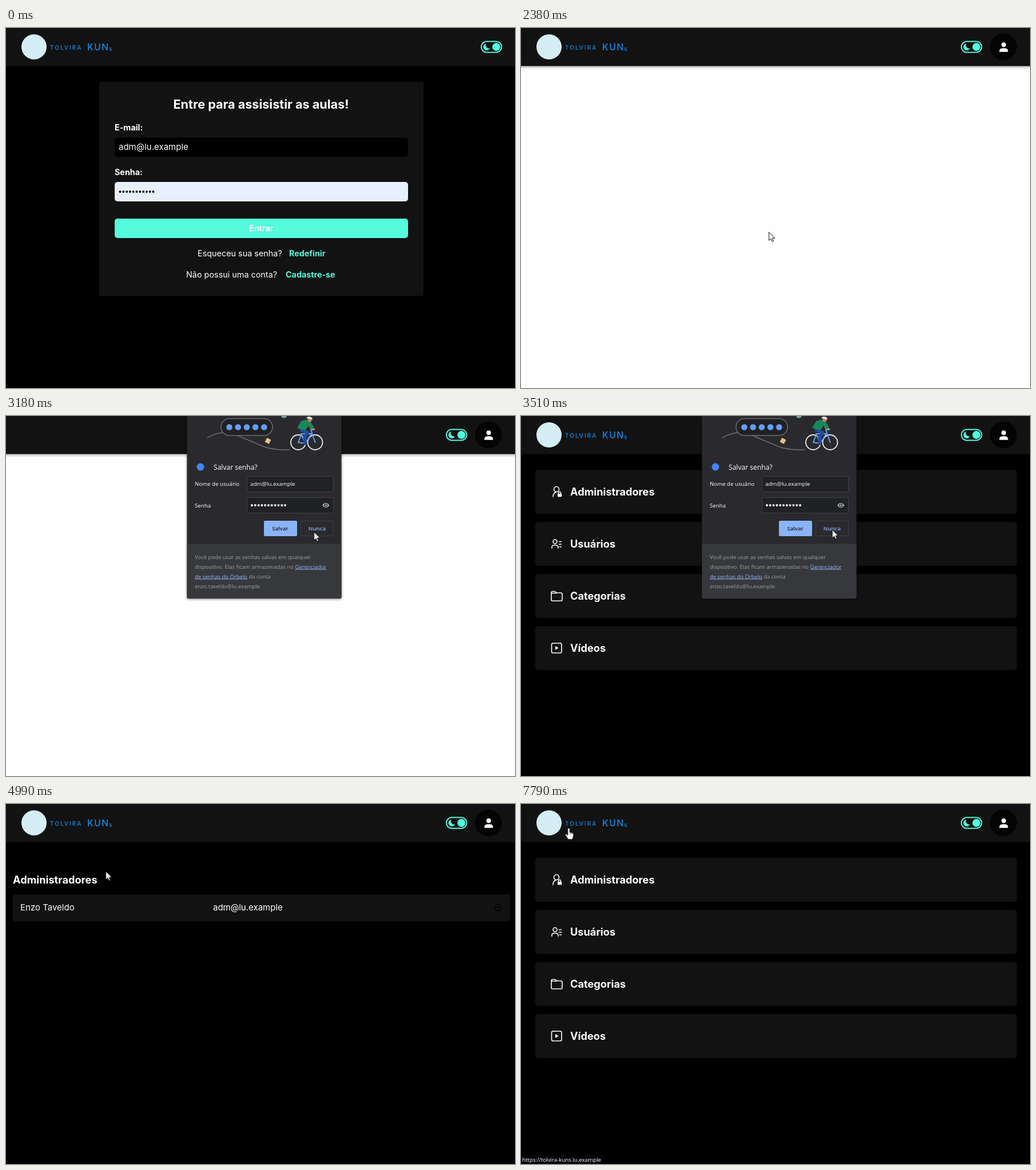
Animation of 890 by 629 pixels, one loop 7.99 s. Source, as an HTML page:

```html
<!DOCTYPE html>
<html lang="pt-BR">
<head>
<meta charset="utf-8">
<title>Painel de aulas</title>
<style>
html, body { margin: 0; width: 100%; height: 100%; overflow: hidden; background: #000; }
svg { display: block; width: 100vw; height: 100vh; }
text { font: 14.4px Inter, sans-serif; fill: #fff; }
.b { font-weight: 700; font-size: 14.3px; }
.h { font-weight: 700; font-size: 18.2px; }
.big { font-size: 21.6px; }
.data { font-size: 15px; }
.mid { text-anchor: middle; }
.mint { fill: #54fbdc; }
.panel { fill: #121212; }
.line { fill: none; stroke: #fff; stroke-width: 1.6; stroke-linecap: round; stroke-linejoin: round; }
#brand text { font-size: 10px; font-weight: 500; letter-spacing: 2px; fill: #0b8df0; }
#brand .wide { font-size: 15.5px; letter-spacing: 1.5px; }
#popup text, .status { font: 9.7px "Open Sans", "Noto Sans", sans-serif; }
#popup .title { font-size: 12.1px; }
#popup .note { font-size: 9.5px; fill: #9aa0a6; }
#popup .link { fill: #8ab4f8; text-decoration: underline; }
#popup .btn { font-weight: 600; }
#popup .save { fill: #202124; }
#popup .never { fill: #8ab4f8; }
.dots { fill: none; stroke-width: 3.9; stroke-linecap: round; stroke-dasharray: 0 5.8; }

/* scenes and swaps are hard cuts on one shared clock */
.cut { animation: 7.99s step-end infinite; }
#login { animation-name: login; }
#idle { animation-name: idle; }
#busy { animation-name: busy; }
#user { animation-name: user; }
#blank { animation-name: blank; }
#brand { animation-name: brand; }
#dash { animation-name: dash; }
#admins { animation-name: admins; }
#status { animation-name: status; }
#arrow { animation-name: arrow; }
#hand { animation-name: hand; }
#beam { animation-name: beam; }
#popup { animation: popup 7.99s linear infinite; }
#cursor { animation: move 7.99s linear infinite; }

@keyframes login { 0% { opacity: 1 } 28.91%, 100% { opacity: 0 } }
@keyframes idle { 0% { opacity: 1 } 21.65%, 100% { opacity: 0 } }
@keyframes busy { 0% { opacity: 0 } 21.65%, 100% { opacity: 1 } }
@keyframes user { 0% { opacity: 0 } 28.91%, 100% { opacity: 1 } }
@keyframes blank { 0% { opacity: 0 } 28.91% { opacity: 1 } 43.05%, 100% { opacity: 0 } }
@keyframes brand { 0% { opacity: 1 } 37.3% { opacity: 0 } 43.05%, 100% { opacity: 1 } }
@keyframes dash { 0% { opacity: 0 } 43.05% { opacity: 1 } 59.07% { opacity: 0 } 95.87%, 100% { opacity: 1 } }
@keyframes admins { 0% { opacity: 0 } 59.07% { opacity: 1 } 95.87%, 100% { opacity: 0 } }
@keyframes status { 0% { opacity: 0 } 96.7%, 100% { opacity: 1 } }
@keyframes popup { 0%, 31.4% { opacity: 0 } 34%, 48% { opacity: 1 } 50%, 100% { opacity: 0 } }
@keyframes arrow {
  0% { opacity: 0 } 4.88% { opacity: 1 } 16.5% { opacity: 0 } 28.91% { opacity: 1 }
  48.6% { opacity: 0 } 59.07% { opacity: 1 } 73.5% { opacity: 0 } 77.6% { opacity: 1 }
  81% { opacity: 0 } 84.9% { opacity: 1 } 91.8%, 100% { opacity: 0 }
}
@keyframes hand {
  0% { opacity: 0 } 16.5% { opacity: 1 } 28.91% { opacity: 0 } 48.6% { opacity: 1 }
  59.07% { opacity: 0 } 81% { opacity: 1 } 84.9% { opacity: 0 } 91.8%, 100% { opacity: 1 }
}
@keyframes beam { 0% { opacity: 0 } 73.5% { opacity: 1 } 77.6%, 100% { opacity: 0 } }
@keyframes move {
  0%, 4.8% { transform: translate(793px, 625px) }
  9.5% { transform: translate(600px, 490px) }
  14.02% { transform: translate(447px, 382px) }
  16.5% { transform: translate(431px, 354px) }
  18.15%, 19.8% { transform: translate(435px, 347px) }
  19.9%, 28.9% { transform: translate(428px, 347px) }
  28.91%, 36.7% { transform: translate(433.5px, 356.5px) }
  39.8%, 40.5% { transform: translate(538.5px, 202.5px) }
  43% { transform: translate(545px, 198px) }
  47.9% { transform: translate(541px, 200px) }
  51.44%, 52.2% { transform: translate(411px, 245px) }
  55.5% { transform: translate(50px, 165px) }
  57.5%, 59.1% { transform: translate(112px, 130px) }
  60.8% { transform: translate(152px, 104px) }
  62.45%, 64.6% { transform: translate(174.5px, 117.5px) }
  68.8% { transform: translate(517px, 194px) }
  74.2%, 77% { transform: translate(109.5px, 132.5px) }
  81% { transform: translate(52px, 46px) }
  83.35%, 84.2% { transform: translate(78px, 35px) }
  87.48% { transform: translate(812px, 50px) }
  88.36%, 89% { transform: translate(827px, 54px) }
  92.49%, 94% { transform: translate(80px, 45px) }
  94.5%, 100% { transform: translate(83.5px, 42px) }
}
</style>
</head>
<body>
<svg viewBox="0 0 890 629" preserveAspectRatio="none">
  <defs>
    <g id="toggle">
      <rect x="1" y="23.5" width="35.5" height="19" rx="9.5" fill="none" stroke="#54fbdc" stroke-width="2"/>
      <circle class="mint" cx="27.3" cy="33" r="7"/>
      <path class="mint" d="M9.5 27.2a6 6 0 1 0 6.6 8.2 5.6 5.6 0 0 1-6.6-8.2z"/>
    </g>
    <linearGradient id="shade" x2="0" y2="1">
      <stop stop-color="#000" stop-opacity=".28"/>
      <stop offset="1" stop-color="#000" stop-opacity="0"/>
    </linearGradient>
    <filter id="drop" x="-10%" y="-10%" width="120%" height="120%">
      <feDropShadow dx="0" dy="1" stdDeviation="2" flood-opacity=".5"/>
    </filter>
  </defs>

  <rect width="890" height="629"/>
  <g id="blank" class="cut">
    <rect y="66" width="890" height="563" fill="#fefefe"/>
    <rect y="66" width="890" height="6" fill="url(#shade)"/>
  </g>
  <rect class="panel" width="890" height="66.5"/>

  <g id="brand" class="cut">
    <circle cx="49" cy="33" r="22" fill="#d5eef5"/>
    <text x="77" y="37.5">TOLVIRA</text>
    <text class="wide" x="142" y="39">KUN<tspan dy="1" font-size="10">s</tspan></text>
  </g>

  <g id="user" class="cut">
    <use href="#toggle" x="769"/>
    <circle cx="843.5" cy="33" r="23.5" fill="#040404"/>
    <circle cx="844" cy="29.3" r="4" fill="#fff"/>
    <path d="M836.5 41.7v-2q0-4.4 7.5-4.4t7.5 4.400v2z" fill="#fff"/>
  </g>

  <g id="login" class="cut">
    <use href="#toggle" x="830"/>
    <rect class="panel" x="163" y="94" width="567" height="374" rx="3"/>
    <text class="h big mid" x="446" y="141">Entre para assisistir as aulas!</text>
    <text class="b" x="190" y="179">E-mail:</text>
    <rect x="190" y="191.5" width="513" height="33.5" rx="5"/>
    <text class="data" x="197" y="213">adm@lu.example</text>
    <text class="b" x="190" y="257">Senha:</text>
    <rect x="190" y="269" width="513" height="34" rx="5" fill="#e8f0fe"/>
    <path class="dots" d="M199.500 286h58.2" stroke="#000"/>
    <rect class="mint" x="190" y="333" width="513" height="34" rx="5"/>
    <text id="idle" class="b mid cut" x="446.5" y="354.5">Entrar</text>
    <text id="busy" class="b mid cut" x="446.5" y="354.5">Aguarde...</text>
    <text x="335" y="398.5">Esqueceu sua senha?</text>
    <text class="b mint" x="495" y="398.5">Redefinir</text>
    <text x="315" y="435.5">Não possui uma conta?</text>
    <text class="b mint" x="489" y="435.5">Cadastre-se</text>
  </g>

  <g id="dash" class="cut">
    <g class="panel">
      <rect x="25" y="94" width="842" height="77" rx="5"/>
      <rect x="25" y="185" width="842" height="77" rx="5"/>
      <rect x="25" y="276" width="842" height="77" rx="5"/>
      <rect x="25" y="367" width="842" height="77" rx="5"/>
    </g>
    <text class="h" x="86" y="138.5">Administradores</text>
    <text class="h" x="86" y="229.5">Usuários</text>
    <text class="h" x="86" y="320.5">Categorias</text>
    <text class="h" x="86" y="411.5">Vídeos</text>
    <g class="line">
      <circle cx="62" cy="128" r="4.5"/>
      <path d="M56 141q0-6 5-8M65.500 136v-1.500a2 2 0 0 1 4 0V136"/>
      <rect x="64.8" y="136.5" width="5.5" height="4" fill="#fff"/>
      <circle cx="59.5" cy="219.5" r="3.5"/>
      <path d="M54 231v-2q0-3.500 5.500-3.500t5.500 3.500v2M66.500 219.500h4M66.500 224h4M67.500 228.500h3"/>
      <path d="M53 321.500V309q0-2.500 2.500-2.500h4l2.500 2.500h8q2 0 2 2v10.500q0 1.500-1.500 1.500h-16q-1.500 0-1.500-1.500zM53 309.500h9"/>
      <rect x="53.5" y="397" width="17.5" height="17" rx="2.5"/>
      <path d="M60.500 403v5l4-2.500z" fill="#fff" stroke-width="1"/>
    </g>
  </g>

  <g id="admins" class="cut">
    <text class="h" x="12" y="138.5">Administradores</text>
    <rect class="panel" x="12" y="158" width="869" height="47" rx="4"/>
    <text class="data" x="25" y="186">Enzo Taveldo</text>
    <text class="data" x="362" y="186">adm@lu.example</text>
    <g fill="none" stroke="#000" stroke-width="1.4">
      <circle cx="860.5" cy="181" r="5.8"/>
      <path d="M857.500 181h6"/>
    </g>
  </g>

  <g id="popup">
    <path d="M316.500 0h270v316q0 3-3 3h-264q-3 0-3-3z" fill="#292a2d" filter="url(#drop)"/>
    <path d="M316.500 223.500h270V316q0 3-3 3h-264q-3 0-3-3z" fill="#37383b"/>
    <path d="M352 38Q378 23 402 33T452 54Q470 60 496 59" fill="none" stroke="#6b6e73" stroke-width="1.5"/>
    <rect x="376" y="4.5" width="90" height="29.5" rx="14.7" fill="#202124" stroke="#6b6e73" stroke-width="1.5"/>
    <path d="M390.500 19.500h61" fill="none" stroke="#669df6" stroke-width="10.6" stroke-linecap="round" stroke-dasharray="0 15.2"/>
    <path d="M481.500 0a4.500 3.500 0 0 0 9 0z" fill="#7fa88c"/>
    <rect x="454" y="39.5" width="8" height="8" fill="#e9c27c" transform="rotate(28 458 43.5)"/>
    <g fill="none" stroke-linecap="round" stroke-linejoin="round">
      <g stroke="#e8eaed" stroke-width="1.8">
        <circle cx="511" cy="46" r="13"/>
        <circle cx="540.5" cy="46" r="13"/>
      </g>
      <path d="M511 46l6-15h17l-11 17-7-17M511 46l12 2M540.500 46L533 24h5" stroke="#669df6" stroke-width="2"/>
      <path d="M516 24l11 5-5 8 1 11" stroke="#234b9c" stroke-width="5.5"/>
      <path d="M529 13l4 8 6 2" stroke="#d58b61" stroke-width="2.5"/>
    </g>
    <path d="M509 21l7-12 9-3 9 6 5 9-4 2-6-6-6 8z" fill="#18885a"/>
    <circle cx="531" cy="7" r="3.5" fill="#c9805a"/>
    <path d="M525 4q2-4 7-2.500 4 1 4 4.500z" fill="#e8eaed"/>

    <circle cx="340" cy="89" r="6.5" fill="#4285f4"/>
    <text class="title" x="363" y="93.5">Salvar senha?</text>
    <text x="330" y="122">Nome de usuário</text>
    <text x="330" y="159.5">Senha</text>
    <g fill="#202124" stroke="#3f4145">
      <rect x="421.5" y="105.5" width="151" height="27" rx="2"/>
      <rect x="421.5" y="142.5" width="151" height="27" rx="2"/>
    </g>
    <text x="427" y="122">adm@lu.example</text>
    <path class="dots" d="M430 156h58.2" stroke="#fff"/>
    <path d="M553 156q6-8.500 12.500 0-6.500 8.500-12.500 0z" fill="#a8abb0"/>
    <circle cx="559.2" cy="156" r="2.3" fill="#a8abb0" stroke="#202124" stroke-width="1.3"/>
    <rect x="451" y="183" width="58" height="27" rx="2" fill="#8ab4f8"/>
    <text class="btn mid save" x="479.5" y="200">Salvar</text>
    <rect x="515.5" y="183.5" width="57" height="26" rx="2" fill="none" stroke="#3f4145"/>
    <text class="btn mid never" x="544" y="200">Nunca</text>
    <text class="note" x="330" y="249.5">Você pode usar as senhas salvas em qualquer</text>
    <text class="note" x="330" y="266.5">dispositivo. Elas ficam armazenadas no <tspan class="link">Gerenciador</tspan></text>
    <text class="note" x="330" y="283.5"><tspan class="link">de senhas do Orbelo</tspan> da conta</text>
    <text class="note" x="330" y="300.5">enzo.taveldo@lu.example.</text>
  </g>

  <g id="status" class="cut">
    <rect y="613" width="143" height="16" fill="#05070d"/>
    <text class="status" x="2" y="624.5">https://tolvira-kuns.lu.example</text>
  </g>

  <g id="cursor">
    <path id="arrow" class="cut" d="M0 0V14.800l3.400-3.100 2.300 5.100 2.400-1-2.300-5h4.700z" fill="#fff" stroke="#000"/>
    <g id="hand" class="cut">
      <path d="M-1.900 1.800a1.900 1.900 0 0 1 3.800 0V7l4.800 1.200q1.800.5 1.800 2.400l-.6 4.800-1.300 4.500h-7.600L-4.600 14.500-6.300 11.300q.3-1.700 2.100-.8l2.300 2z" fill="#fff" stroke="#000"/>
      <path d="M2 7.500v3M4.200 8v2.800M6.300 8.600v2.500" stroke="#000" stroke-width=".7"/>
    </g>
    <path id="beam" class="cut" d="M-3-6h2l1 .8 1-.8h2M0-5.200V5.200M-3 6h2l1-.8 1 .8h2" fill="none" stroke="#fff"/>
  </g>
</svg>
</body>
</html>
```
